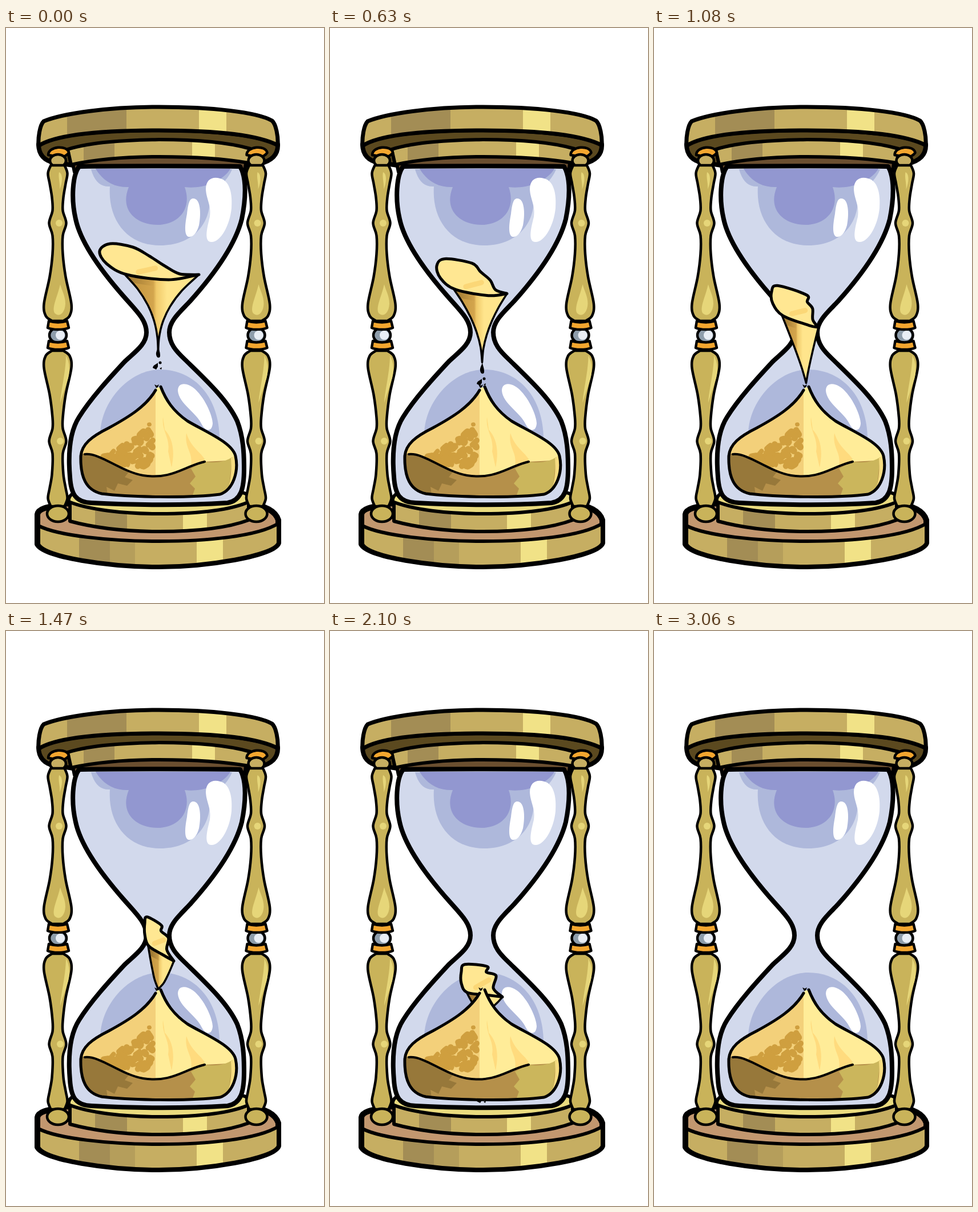
Write an HTML page that moves like this. It is 557x1005 px and loops after 4.29 s.

```html
<!DOCTYPE html>
<html lang="en">
<head>
<meta charset="utf-8">
<title>Hourglass</title>
<style>
  html, body { margin: 0; width: 100%; height: 100%; overflow: hidden; background: #fff; }
  svg { display: block; width: 557px; height: 1005px; }
  .ink { stroke: #000; stroke-linejoin: round; stroke-linecap: round; }
</style>
</head>
<body>
<svg viewBox="0 0 557 1005" fill="none">
  <defs id="defs">
    <clipPath id="funnelClip"><path data-d="funnel"/></clipPath>
    <clipPath id="pileClip"><path d="M265 628C248 660 215 680 180 699C150 714 133 727 131 748C130 785 140 808 168 814C220 820 320 822 375 815C398 807 408 775 402 748C396 724 348 705 318 687C292 669 277 648 269 628Z"/></clipPath>
    <linearGradient id="grain">
      <stop offset=".1" stop-color="#c4953f"/><stop offset=".4" stop-color="#d3a54d"/>
      <stop offset=".44" stop-color="#f0c969"/><stop offset=".58" stop-color="#ffe58c"/>
    </linearGradient>
    <linearGradient id="shade">
      <stop offset=".2" stop-color="#997532"/><stop offset=".55" stop-color="#997532" stop-opacity="0"/>
    </linearGradient>
  </defs>

  <!-- top cap -->
  <g class="ink" stroke-width="6">
    <path fill="#5b491f" stroke-width="8" d="M57 203C57 222 68 232 84 235L118 240H415L445 237C465 232 477 222 476 203C440 186 360 178 268 178C180 178 90 184 57 203Z"/>
    <path fill="#6b4f30" d="M112 214L120 252C160 241 380 241 418 250L424 212Z"/>
    <path fill="url(#ringTop)" d="M108 212C150 199 210 196 268 195C330 195 390 200 428 211L426 236C380 228 320 225 268 225C210 225 160 229 114 239Z"/>
    <path fill="url(#capBand)" stroke-width="7" d="M66 163C100 149 180 138 268 138C360 138 440 147 466 162C473 168 477 190 476 205C440 186 360 179 268 179C180 179 90 184 57 206C56 192 59 170 66 163Z"/>
  </g>

  <!-- base -->
  <g class="ink" stroke-width="6">
    <path fill="#c2976f" stroke-width="10" d="M55 850C57 838 76 837 115 830H425C455 836 472 844 477 860V900C470 922 350 941 268 941C180 941 66 924 55 902Z"/>
    <path fill="url(#rim)" d="M57 870C90 887 180 897 268 897C350 897 440 889 477 866V900C470 922 350 941 268 941C180 941 66 924 57 902Z"/>
    <path fill="url(#ringLow)" d="M112 820V862C160 875 210 880 268 880C330 880 385 875 425 860V820Z"/>
    <path fill="#eadb7f" d="M110 828C108 815 120 811 135 811H400C418 811 430 815 426 828C390 844 330 849 268 849C205 849 145 842 110 828Z"/>
  </g>

  <!-- glass -->
  <path class="ink" stroke-width="8" fill="#d2d9ec" d="M128 242C116 258 114 300 122 334C131 376 168 426 206 469C228 494 246 510 246 532C246 553 226 566 208 583C180 613 148 648 128 680C110 708 109 750 112 785C114 815 122 829 150 830C230 834 320 834 388 830C412 826 417 805 417 770C417 745 416 715 405 687C388 650 350 615 314 580C298 565 286 552 286 532C286 512 304 497 322 478C358 438 400 385 413 334C420 300 422 262 410 242C380 241 160 241 128 242Z"/>
  <g fill="#aeb8db">
    <path d="M149 247C155 268 165 278 182 277C178 335 212 380 270 380C325 380 357 345 357 300C357 285 385 275 396 247Z"/>
    <path d="M165 715C163 655 215 597 270 597C330 597 374 645 374 720Z"/>
  </g>
  <path fill="#9297d0" d="M157 246C170 268 190 279 215 278C198 320 230 344 265 344C300 344 327 318 313 278C345 282 380 268 393 246Z"/>
  <g fill="#fff">
    <path d="M350 282C350 264 362 259 375 263C392 267 397 290 395 315C392 345 376 374 360 374C346 374 352 350 357 330C360 310 351 300 350 282Z"/>
    <path d="M328 298C341 298 342 325 338 345C334 360 326 366 320 365C312 363 313 345 317 325C319 308 321 298 328 298Z"/>
    <path d="M301 634C301 619 317 619 331 631C351 650 362 680 362 691C361 706 350 706 343 693C334 672 303 657 301 634Z"/>
  </g>

  <!-- falling sand -->
  <g id="sand">
    <g id="drip" fill="#000">
      <path d="M267 556C266 561 262 566 263 571C264 578 271 578 270 571C270 566 267 561 267 556Z"/>
      <path d="M257 594C258 588 264 588 266 585V592L263 597ZM269 595L273 593L272 597Z"/>
      <circle cx="270" cy="585" r="2.5"/>
    </g>
    <path data-d="funnel" fill="url(#grain)"/>
    <path data-d="face" stroke="url(#shade)" stroke-width="24" clip-path="url(#funnelClip)"/>
    <path data-d="funnel" class="ink" stroke-width="3.5"/>
    <path data-d="face" class="ink" fill="#ffe792" stroke-width="5"/>
    <path data-d="glow" stroke="#fbd777" stroke-width="9" stroke-linecap="round"/>
  </g>

  <!-- pile -->
  <g clip-path="url(#pileClip)">
    <path fill="#f3d07a" d="M120 610H270V830H120Z"/>
    <path fill="#ffec98" d="M262 610H410V830H262Z"/>
    <g id="flecks" stroke="#cf9f3f" stroke-linecap="round"/>
    <path fill="#ffdb7e" d="M275 680C272 705 288 715 284 740L290 768C297 735 290 715 278 702ZM316 708C312 735 328 740 324 765L350 762C350 745 325 738 316 708Z"/>
    <path fill="#b5904a" d="M125 744C165 742 200 776 240 782C290 790 315 764 348 758L410 755V830H125Z"/>
    <path fill="#97783a" d="M125 744C160 743 180 762 215 776L208 785L222 790L212 800L196 796L190 809L176 802L180 830H125Z"/>
    <path fill="#cbb65c" d="M324 770L348 758C370 762 388 756 396 750L388 830H322L331 805L322 796L332 784Z"/>
    <path fill="#f6dc80" d="M394 752L410 740V830H379C393 806 396 776 394 752Z"/>
    <path class="ink" stroke-width="4" d="M138 745C165 742 200 775 240 782C290 790 312 766 348 758"/>
  </g>
  <path class="ink" stroke-width="5" d="M262 633C246 661 215 680 180 699C150 714 133 727 131 748C130 785 140 808 168 814C220 820 320 822 375 815C398 807 408 775 402 748C396 724 348 705 318 687C292 669 280 650 271 627"/>
  <path fill="#000" d="M260 623L264 625L268 623L266 628L263 629Z"/>

  <g id="columns"></g>
</svg>
<script>
const $ = id => document.getElementById(id);
const gold = '#c6ae62', dull = '#a38d55', shine = '#f1e287';

// Hard-edged colour bands across the stage: a dull stretch and a bright one.
function bands(id, ...stretches) {
  const stop = (x, color) => `<stop offset="${x / 557}" stop-color="${color}"/>`;
  const stops = stretches.map(([from, to, color]) =>
    stop(from, gold) + stop(from, color) + stop(to, color) + stop(to, gold)).join('');
  $('defs').insertAdjacentHTML('beforeend',
    `<linearGradient id="${id}" gradientUnits="userSpaceOnUse" x2="557">${stops}</linearGradient>`);
}
bands('capBand', [107, 211, dull], [338, 386, shine]);
bands('ringTop', [136, 190, dull], [326, 366, shine]);
bands('ringLow', [156, 212, dull], [310, 352, shine]);
bands('rim', [128, 182, dull], [182, 226, '#b59e5b'], [334, 380, shine]);

// Smooth open curve through [x, y] points, without its opening move.
function curve(p) {
  let d = '';
  for (let i = 0; i < p.length - 1; i++) {
    const a = p[i - 1] || p[i], b = p[i], c = p[i + 1], e = p[i + 2] || c;
    const mid = k => [b[k] + (c[k] - a[k]) / 6, c[k] - (e[k] - b[k]) / 6];
    const [x1, x2] = mid(0), [y1, y2] = mid(1);
    d += `C${x1} ${y1} ${x2} ${y2} ${c[0]} ${c[1]}`;
  }
  return d;
}

// Half of a turned column, from its vase end outwards past a bead.
function turned(end, dir, bead) {
  const profile = [[0, 10], [9, 21], [30, 24], [77, 14], [117, 9], [bead - 22, 9], [bead, 15],
    [bead + 22, 9], [216, 10], [240, 14], [258, 17], [272, 12]];
  const left = profile.map(([y, w]) => [90.5 - w, end + dir * y]);
  const right = left.map(([x, y]) => [181 - x, y]).reverse();
  return `<path fill="#c9b35a" d="M${left[0]}${curve(left)}L${right[0]}${curve(right)}Z"/>`;
}
const collar = y => `<path fill="#f3a62f" d="M75 ${y}C85 ${y + 3} 97 ${y + 3} 107 ${y}L110 ${y + 12}C100 ${y + 16} 82 ${y + 16} 73 ${y + 12}Z"/>`;
const column = x => `<g transform="translate(${x})">
  <g class="ink" stroke-width="4.5">
    <path fill="#f3a62f" d="M74 222C74 206 108 204 110 218C106 224 100 226 92 225Z"/>
    <ellipse cx="91" cy="232" rx="14" ry="11" fill="${gold}"/>
    ${turned(512, -1, 171)}${turned(564, 1, 158)}
    <ellipse cx="91" cy="849" rx="19" ry="14" fill="#c9b35a"/>
    <ellipse cx="91" cy="537" rx="15" ry="13" fill="#8e9dab"/>
    ${collar(512)}${collar(547)}
  </g>
  <circle cx="95" cy="537" r="8" fill="#e9eef5"/>
  <g fill="#e6d679">
    <path d="M95 448C90 470 80 488 85 498C92 506 103 500 104 482C104 468 98 460 95 448Z"/>
    <path d="M105 572C112 585 113 603 107 618C103 630 98 645 95 655C96 635 105 600 105 572Z"/>
    <circle cx="93" cy="341" r="6"/><circle cx="95" cy="722" r="6"/>
    <path d="M93 252C100 255 99 270 94 282C95 270 91 262 93 252Z"/>
  </g></g>`;
$('columns').innerHTML = column(0) + column(347.5);

// Mottled dark grains on the shaded slope.
let seed = 7;
const rnd = () => (seed = seed * 16807 % 2147483647) / 2147483647;
let flecks = '';
for (let i = 0; i < 70; i++) {
  const u = rnd(), x = 174 + 84 * u, y = 748 - 60 * u + rnd() * (14 + 60 * u);
  flecks += `<path stroke-width="${6 + rnd() * 8}" d="M${x} ${y}l${4 - rnd() * 12} ${rnd() * 8}"/>`;
}
$('flecks').innerHTML = flecks;

const axis = 266, end = 3060, loop = 4290;

// Sand face as [share of half width, depth]: right tip, far edge, near edge.
const slope = [[1, 54], [.54, 53], [.17, 39], [-.14, 22], [-.43, 6], [-.82, 0], [-1, 13], [-.88, 35], [-.53, 54], [.26, 63]];
const block = [[1, 58], [.56, 43], [.69, 21], [.22, 15], [.25, 5], [-.83, 2], [-1, 15], [-1, 35], [-.72, 51], [.25, 55]];

// How the face is squeezed by the glass: half widths and the tip's extra drop.
const squeeze = [
  { t: 0, left: 102, right: 72, lean: 0 },
  { t: 630, left: 79, right: 44, lean: 7 },
  { t: 1080, left: 60, right: 22, lean: 20 },
  { t: 1470, left: 23, right: 28, lean: 23 },
  { t: 2100, left: 36, right: 36, lean: 1 },
  { t: 2580, left: 49, right: 25, lean: -25 },
  { t: end, left: 22, right: 10, lean: 0 }
];
const lerp = (a, b, k) => a + (b - a) * k;
const ease = k => (k = Math.min(k, 1), k * k * (3 - 2 * k));

function squeezeAt(t) {
  const i = Math.max(1, squeeze.findIndex(s => s.t >= t)), a = squeeze[i - 1], b = squeeze[i];
  const at = key => lerp(a[key], b[key], (t - a.t) / (b.t - a.t));
  return { left: at('left'), right: at('right'), lean: at('lean') };
}

const shapes = [...document.querySelectorAll('[data-d]')];
function draw(t) {
  $('sand').style.display = t < end ? '' : 'none';
  if (t >= end) return;

  const fall = 290 * Math.sin(t / 3320 * Math.PI / 2) ** 2, top = 377 + fall;
  const mix = ease(t / 1700), { left, right, lean } = squeezeAt(t);
  const face = slope.map(([u, v], i) => {
    const w = lerp(u, block[i][0], mix), dx = w * (w < 0 ? left : right);
    return [axis + dx, top + lerp(v, block[i][1], mix) + lean * (dx + left) / (left + right)];
  });
  const tip = face[0], near = face[8];
  const between = (a, b, k) => [lerp(a[0], b[0], k), lerp(a[1], b[1], k)];

  // The funnel narrows to a tail that stops at the pile.
  const shoulder = between(face[7], near, .8);
  const tail = [axis + .5, Math.max(570 + 56 * ease(t / 1250) ** 2, top + 85)];
  const side = from => [0, .2, .4, .6, .8, 1].map(k =>
    [lerp(tail[0], from[0], (1 - k) ** (2.4 - 1.8 * mix)), lerp(from[1], tail[1], k)]);

  const d = {
    face: `M${tip}${curve([...face, tip])}Z`,
    funnel: `M${shoulder}${curve(side(shoulder))}${curve(side(tip).reverse())}Z`,
    glow: `M${between(near, face[2], .3)}L${between(near, face[2], .75)}`
  };
  for (const el of shapes) el.setAttribute('d', d[el.dataset.d]);
  $('drip').setAttribute('transform', `translate(0 ${1.12 * fall})`);
}

const start = performance.now();
function tick(now) {
  const t = Math.max(0, now - start) % loop;
  draw(Math.floor(t / 30) * 30);
  requestAnimationFrame(tick);
}
draw(0);
requestAnimationFrame(tick);
</script>
</body>
</html>
```
